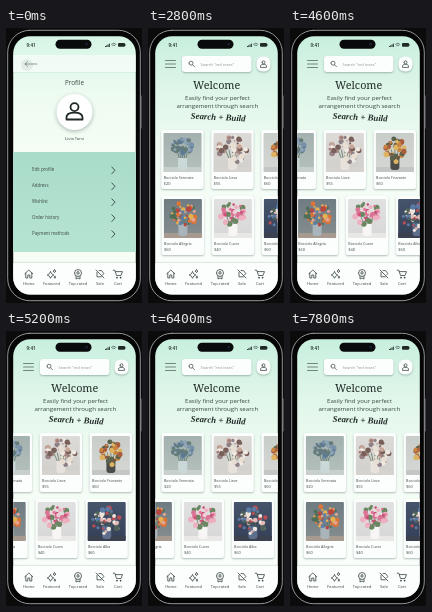
Recreate the animation shown at these times as an HTML page with a canvas. Size 136 by 275 pixels, loop 8 s.

```html
<!DOCTYPE html>
<html lang="en">
<head>
<meta charset="utf-8">
<title>Flower shop app</title>
<style>
html, body { margin: 0; width: 100%; height: 100%; overflow: hidden; background: #0b0b0c; }
canvas { display: block; width: 136px; height: 275px; }
</style>
</head>
<body>
<canvas id="stage"></canvas>
<script>
const W = 136, H = 275, LOOP = 8000, STEP = 200;
const SANS = '"Open Sans", "Noto Sans", sans-serif';
const SERIF = '"Noto Serif", serif';
const SCRIPT = '"Liberation Serif", serif';
const INK = '#3a4642';
const DARK = '#202a27';
const canvas = document.getElementById('stage');
const ratio = Math.max(1, window.devicePixelRatio || 1);
canvas.width = W * ratio;
canvas.height = H * ratio;
const c = canvas.getContext('2d');

function box(x, y, w, h, r, fill) {
  c.beginPath();
  c.roundRect(x, y, w, h, r);
  if (fill) { c.fillStyle = fill; c.fill(); }
}

function disc(x, y, r, fill) {
  c.beginPath();
  c.arc(x, y, r, 0, Math.PI * 2);
  c.fillStyle = fill;
  c.fill();
}

function line(path, width = 0.8, color = INK) {
  c.strokeStyle = color;
  c.lineWidth = width;
  c.lineCap = c.lineJoin = 'round';
  c.stroke(new Path2D(path));
}

function text(str, x, y, size, { align = 'left', font = SANS, style = '', color = INK } = {}) {
  c.font = `${style} ${size}px ${font}`;
  c.textAlign = align;
  c.textBaseline = 'alphabetic';
  c.fillStyle = color;
  c.fillText(str, x, y);
}

function fade(y0, y1, ...colors) {
  const g = c.createLinearGradient(0, y0, 0, y1);
  colors.forEach((col, i) => g.addColorStop(colors.length > 1 ? i / (colors.length - 1) : 0, col));
  return g;
}

function shadowed(draw, blur = 2, dy = 1) {
  c.save();
  c.shadowColor = 'rgba(40,70,60,.35)';
  c.shadowBlur = blur * ratio;
  c.shadowOffsetY = dy * ratio;
  draw();
  c.restore();
}

function at(x, y, draw, scale = 1, turn = 0) {
  c.save();
  c.translate(x, y);
  c.rotate(turn);
  c.scale(scale, scale);
  draw();
  c.restore();
}

function random(seed) {
  return () => (seed = (seed * 16807) % 2147483647) / 2147483647;
}

const person = () => line('M-2 -2.2a2 2 0 1 0 4 0a2 2 0 1 0 -4 0M-4 4v-1c0-2 2-2.4 4-2.4s4 .4 4 2.4v1z', 0.9, DARK);

// Photos as flat blobs: wall, table, blooms, vase, bloom centre, half width and half height
const rows = [
  { y: 102, cards: [
    { name: 'Bocciolo Serenata', price: '$20', wall: ['#a3b1af', '#b4c0bb'], table: '#c9d0cb', blooms: ['#7891a8', '#5e7a92', '#8fa5b5', '#657b78'], vase: '#cbd8d8', cy: 13, rx: 11, ry: 8 },
    { name: 'Bocciolo Lieve', price: '$55', wall: ['#dcdbd8', '#d0cfcc'], table: '#d6d3cf', blooms: ['#e9ded2', '#795f59', '#c6a799', '#a5827e', '#f0e9e2', '#8e8087'], vase: '#e7e2dc', cy: 17, rx: 15, ry: 13 },
    { name: 'Bocciolo Frizzante', price: '$60', wall: ['#c9cdca', '#d4d7d3'], table: '#c3c7c3', blooms: ['#c98442', '#6a5a44', '#dcb462', '#59624b', '#a85d3f'], vase: '#4b4c49', cy: 17, rx: 10, ry: 12 }
  ] },
  { y: 168, cards: [
    { name: 'Bocciolo Allegria', price: '$60', wall: ['#6f7c82', '#858e90'], table: '#a79b8f', blooms: ['#dd7438', '#e6b152', '#b94741', '#4f6f58', '#5f7fa6', '#e3a38f'], vase: '#a9b4bb', cy: 16, rx: 13, ry: 12 },
    { name: 'Bocciolo Cuore', price: '$40', wall: ['#e0e1e0', '#d6d7d6'], table: '#e9e8e6', blooms: ['#dc7395', '#eeafc0', '#6b8762', '#cd5279', '#f0ccd5'], vase: '#f7f6f4', cy: 15, rx: 13, ry: 11 },
    { name: 'Bocciolo Alba', price: '$60', wall: ['#46546b', '#344057'], table: '#3c4150', blooms: ['#b94e55', '#e2b9b4', '#eee5dd', '#4d6259', '#5b7aa5'], vase: '#5d6f8d', cy: 19, rx: 14, ry: 13 }
  ] }
];

function photo(x, y, p, seed) {
  c.save();
  box(x, y, 38, 39, 1, fade(y, y + 39, ...p.wall));
  c.clip();
  c.translate(x + 19, y);
  c.fillStyle = p.table;
  c.fillRect(-19, 34, 38, 5);
  for (let i = -2; i <= 2; i++) line(`M${i} 29L${i * 3.5} ${p.cy}`, 0.7, '#526c56');
  box(-4.5, 25, 9, 12, [1, 1, 3, 3], p.vase);
  const rnd = random(seed * 971 + 53);
  for (let i = 0; i < 46; i++) {
    const a = rnd() * Math.PI * 2, r = Math.sqrt(rnd());
    disc(Math.cos(a) * r * p.rx, p.cy + Math.sin(a) * r * p.ry, 1 + rnd() * 1.9, p.blooms[i % p.blooms.length]);
  }
  c.restore();
}

function drawRow(row, shift, seed) {
  row.cards.forEach((p, i) => {
    const x = 13.6 + i * 50 + shift, y = row.y;
    shadowed(() => box(x, y, 42.4, 59, 2, '#fcfefd'));
    photo(x + 2.3, y + 3, p, seed + i);
    text(p.name, x + 2.5, y + 49.1, 3.6);
    text(p.price, x + 2.5, y + 54.8, 3.9);
  });
}

function statusBar() {
  text('9:41', 20.5, 19, 4.6, { style: '600', color: DARK });
  box(49.5, 11.7, 36, 9, 4.5, '#090a0b');
  disc(80.5, 16.2, 1.4, '#171d2a');
  c.fillStyle = DARK;
  for (let i = 0; i < 4; i++) c.fillRect(99 + i * 1.3, 18 - i * 0.8, 0.9, 1 + i * 0.8);
  line('M105.5 16.2q2.2-2.2 4.4 0M106.6 17.5q1.1-1 2.2 0', 0.7);
  box(112, 15, 7, 3.8, 1, DARK);
  c.fillRect(119.4, 16.2, 0.6, 1.4);
}

function star(x, y, r) {
  const q = r * 0.2;
  line(`M${x} ${y - r}Q${x + q} ${y - q} ${x + r} ${y}Q${x + q} ${y + q} ${x} ${y + r}Q${x - q} ${y + q} ${x - r} ${y}Q${x - q} ${y - q} ${x} ${y - r}`);
}

const tabs = [
  ['Home', 22.8, () => line('M-4 -.2L0 -4L4 -.2M-3 -1V4H-1V1H1V4H3V-1')],
  ['Featured', 45.5, () => { star(-1, 1, 3.3); star(3, -2.8, 1.5); star(3.4, 3.3, 1); }],
  ['Top-rated', 72, () => {
    line('M-3.5 -1a3.5 3.5 0 1 0 7 0a3.5 3.5 0 1 0 -7 0M-2 2.2V5L0 4L2 5V2.2');
    star(0, -1, 1.5);
  }],
  ['Sale', 94, () => line('M-4 -4L4 4M-1 -3.4H1.6L3.8 -.5L2.6 1M-3 -1.6V2.8H1.4')],
  ['Cart', 112, () => {
    line('M-4.8 -3.8H-3.2L-1.5 1.5H3L4.5 -2.4H-2.6');
    disc(-1, 3.6, 0.9, INK);
    disc(2.6, 3.6, 0.9, INK);
  }]
];

function navBar() {
  shadowed(() => { c.fillStyle = '#fbfefc'; c.fillRect(5, 235, 127, 35); }, 2, -0.5);
  for (const [label, x, icon] of tabs) {
    at(x, 246, icon);
    text(label, x, 257.4, 4.1, { align: 'center' });
  }
}

function profile() {
  c.fillStyle = fade(8, 124, '#d6f5e5', '#eefbf1', '#f5fdf4');
  c.fillRect(5, 7, 127, 262);
  c.fillStyle = 'rgba(255,255,255,.55)';
  c.fillRect(5, 27, 127, 17);
  c.fillStyle = 'rgba(80,120,105,.13)';
  c.fillRect(5, 44, 127, 0.7);
  disc(21, 37, 6, 'rgba(70,90,85,.09)');
  line('M31 36H19M21.5 33.7L19 36L21.5 38.3', 0.7, '#66756f');
  text('Profile', 68.5, 57, 6.3, { align: 'center' });
  shadowed(() => disc(68.5, 84, 18, '#fff'), 4, 1.5);
  at(68.5, 83.5, person, 2);
  text('Livia Tarsi', 68.5, 112, 4.2, { align: 'center' });
  c.fillStyle = fade(124, 225, '#aadcca', '#b6e4d3');
  c.fillRect(5, 124, 127, 100);
  ['Edit profile', 'Address', 'Wishlist', 'Order history', 'Payment methods'].forEach((label, i) => {
    const y = 142 + i * 15.9;
    text(label, 26, y + 1.2, 4.4);
    line(`M105.8 ${y - 3}L109 ${y + 0.4}L105.8 ${y + 3.8}`, 0.9);
  });
}

function home(shifts) {
  c.fillStyle = fade(8, 235, '#c8efde', '#dff6e9', '#effbf2', '#f6fdf7', '#f9fefa');
  c.fillRect(5, 7, 127, 262);
  line('M17.5 32.5H27.5M17.5 36H27.5M17.5 39.5H27.5', 0.9, '#6a7973');
  shadowed(() => box(34, 28, 69.5, 16, 3, '#fcfefd'));
  line('M41 35.2a2 2 0 1 0 4 0a2 2 0 1 0 -4 0M44.5 36.7L46.5 38.7', 0.7);
  text('Search “red roses”', 52.5, 37.6, 4, { color: '#8a9691' });
  shadowed(() => box(108.5, 28.5, 14, 15, 6, '#fcfefd'));
  at(115.5, 36, person, 0.75);
  text('Welcome', 68.7, 61, 10.8, { align: 'center', font: SERIF, color: DARK });
  text('Easily find your perfect', 69.5, 72, 6.1, { align: 'center' });
  text('arrangement through search', 69.3, 80, 6.1, { align: 'center' });
  at(70, 92, () => text('Search + Build', 0, 0, 8.8, { align: 'center', font: SCRIPT, style: 'italic bold', color: DARK }), 1, 0.05);
  rows.forEach((row, i) => drawRow(row, shifts[i], 1 + i * 3));
}

function ease(t, from, to) {
  const k = Math.min(1, Math.max(0, (t - from) / (to - from)));
  return k * k * (3 - 2 * k);
}

// A drag that pulls past the end of the row, then springs back
function swipe(t, start, span) {
  const u = (t - start) / span;
  const pull = ease(u, 0.45, 0.68) - ease(u, 0.68, 1);
  return ease(u, 0, 0.6) + 0.14 * pull;
}

function shiftsAt(t) {
  return [
    -30 * (swipe(t, 2750, 1250) - swipe(t, 5900, 950)),
    -30 * (swipe(t, 4350, 1250) - swipe(t, 6900, 900))
  ];
}

function phone() {
  c.fillStyle = '#0b0b0c';
  c.fillRect(0, 0, W, H);
  line('M135 68V100', 0.9, '#8b8d8f');
  box(1.7, 2.3, 132.6, 270.4, 22, '#050506');
  c.strokeStyle = '#929496';
  c.lineWidth = 1;
  c.stroke();
}

function render(t) {
  c.setTransform(ratio, 0, 0, ratio, 0, 0);
  phone();
  c.save();
  box(7.2, 8.2, 122.6, 258.3, 17);
  c.clip();
  if (t < 1600) profile();
  if (t >= 1400) {
    c.globalAlpha = t < 1600 ? 0.5 : 1;
    home(shiftsAt(t));
    c.globalAlpha = 1;
  }
  statusBar();
  navBar();
  c.restore();
}

const start = performance.now();
function tick() {
  const t = (performance.now() - start) % LOOP;
  render(Math.floor(t / STEP) * STEP);
  requestAnimationFrame(tick);
}
tick();
</script>
</body>
</html>
```
